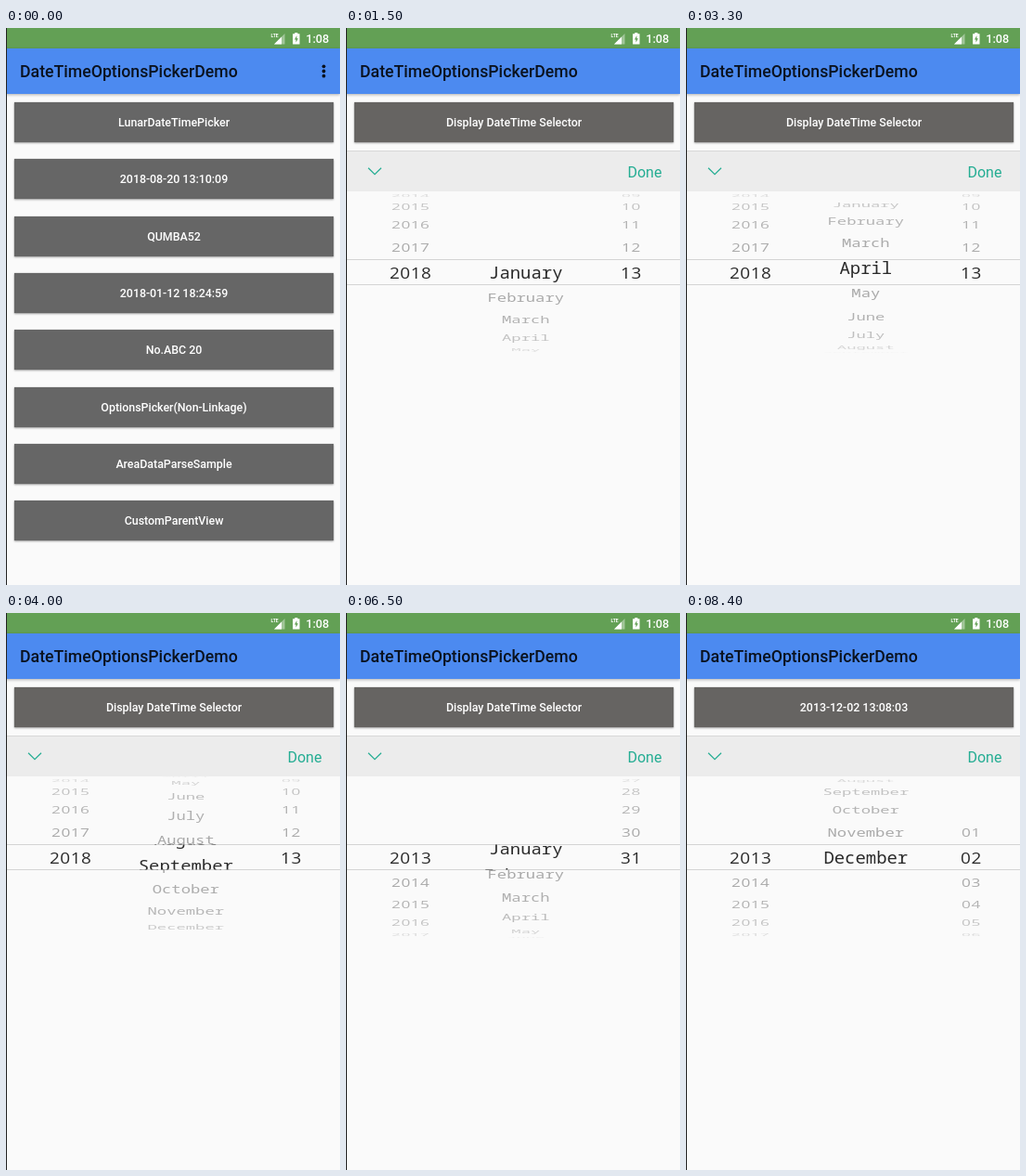
Animation, 360 px wide and 600 px high, one loop 8.6 s. Source, as an HTML page:

```html
<!DOCTYPE html>
<html lang="en">
<head>
<meta charset="utf-8">
<title>Date picker demo</title>
<style>
  html, body { margin: 0; width: 100%; height: 100%; overflow: hidden; background: #000; }
  #stage { position: relative; width: 360px; height: 600px; overflow: hidden; font-family: Roboto, sans-serif; }
  .screen { position: absolute; inset: 0; background: #fafafa; }
  .status { height: 22px; background: #63a055; }
  .bar {
    height: 49px; line-height: 50px; padding-left: 15px; background: #4c8af0;
    box-shadow: 0 1px 3px rgba(0, 0, 0, .3);
    font-size: 17.7px; font-weight: 500; color: rgba(0, 0, 0, .87);
  }
  .btn {
    position: absolute; left: 9px; width: 344px; height: 43px; line-height: 44px;
    background: #666; box-shadow: 0 0 1px rgba(0, 0, 0, .35), 0 1px 2px rgba(0, 0, 0, .35);
    font-size: 12.4px; font-weight: 500; color: #fff; text-align: center;
  }
  #result { top: 80px; background: #666462; }
  #panel { position: absolute; left: 0; top: 132px; width: 360px; height: 468px; }
  .tools {
    box-sizing: border-box; height: 44px; line-height: 45px; padding-right: 19.6px;
    background: #ececec; border-top: 1px solid #d8d8d8;
    font-size: 16px; color: #24ad93; text-align: right;
  }
  svg { position: absolute; left: 0; top: 0; }
  #wheels { top: -132px; }
  #wheels text { font-size: 17.2px; text-anchor: middle; }
  .num { font-family: "Open Sans", sans-serif; letter-spacing: .028em; }
  .word { font-family: "Noto Sans Mono", monospace; }
  #outer { fill: #a8a8a8; }
  #inner { fill: #2a2a2a; }
  .clock { font-size: 12.7px; font-weight: 500; }
  .lte { font-size: 5px; font-weight: 700; }
  #edge { position: absolute; left: 0; top: 0; width: 1px; height: 600px; background: #222; }
</style>
</head>
<body>
<div id="stage">
  <div class="screen" id="home">
    <div class="status"></div>
    <div class="bar">DateTimeOptionsPickerDemo</div>
    <svg width="360" height="80" fill="rgba(0,0,0,.87)">
      <circle cx="342.5" cy="41.3" r="1.9"/><circle cx="342.5" cy="46.5" r="1.9"/><circle cx="342.5" cy="51.7" r="1.9"/>
    </svg>
  </div>

  <div class="screen" id="page">
    <div class="status"></div>
    <div class="bar">DateTimeOptionsPickerDemo</div>
    <div class="btn" id="result"></div>
    <div id="panel">
      <div class="tools">Done</div>
      <svg id="wheels" width="360" height="600">
        <clipPath id="clipOuter"><path d="M0 176H360V249.5H0zM0 276.5H360V350H0z"/></clipPath>
        <clipPath id="clipInner"><path d="M0 249.5H360V276.5H0z"/></clipPath>
        <path d="M24 150.8L31 157.6L38 150.8" fill="none" stroke="#24ad93" stroke-width="1.2"/>
        <path d="M0 249.5H360M0 276.5H360" stroke="#d4d4d4"/>
        <g id="outer" clip-path="url(#clipOuter)"></g>
        <g id="inner" clip-path="url(#clipInner)"></g>
      </svg>
    </div>
  </div>

  <svg width="360" height="22" fill="#fff">
    <text class="lte" x="285.5" y="9.5">LTE</text>
    <path d="M289 17.5H300.5V6z" opacity=".4"/>
    <path d="M289 17.5H297V9.5z"/>
    <path d="M311.3 5h3v1.2h2.2v11.3h-7.4v-11.3h2.2z"/>
    <path d="M313.4 8l-2.4 4.4h1.5v3.4l2.4-4.5h-1.5z" fill="#63a055"/>
    <text class="clock" x="323.3" y="16.3">1:08</text>
  </svg>
  <div id="edge"></div>
</div>

<script>
const LOOP = 8600, STEP = 100;
const MID = 263.3, RADIUS = 87, ANGLE = Math.PI / 10;
const $ = id => document.getElementById(id);
const pad = n => String(n).padStart(2, '0');
const range = (n, make) => Array.from({ length: n }, (_, i) => make(i));

// Linear track through [time, value] points
function track(points, t) {
  if (t <= points[0][0]) return points[0][1];
  for (let i = 1; i < points.length; i++) {
    const [t0, v0] = points[i - 1], [t1, v1] = points[i];
    if (t < t1) return v0 + (v1 - v0) * (t - t0) / (t1 - t0);
  }
  return points[points.length - 1][1];
}

const slide = [[500, 12], [600, 4], [700, 1], [800, 0]];
const fade = [[500, .88], [600, .97], [700, 1]];
const yearPos = [[5300, 5], [5400, 4.8], [5500, 3.4], [5600, 1.5], [5700, .4], [5800, 0]];
const monthPos = [
  [2500, 0], [2600, .1], [2800, .8], [3100, 2.5], [3300, 3.18], [3500, 3.9], [3800, 6.6], [4000, 7.7], [4200, 8],
  [4500, 8], [4600, 7.7], [4800, 3.4], [4900, 1], [5000, .16], [5200, 0],
  [6400, 0], [6500, .33], [6700, 4], [6900, 9.2], [7000, 10.6], [7200, 11]
];
const dayPos = [[7200, 8], [7300, 7.8], [7400, 6.9], [7500, 4.6], [7600, 2.6], [7700, 1.4], [7800, 1]];

// Day limits follow the month and year picked
function days(t) {
  if (t < 4400) return { pos: 12, min: 0, max: 12 };
  if (t < 5400) return { pos: 12, min: 0, max: 29 };
  if (t < 6100) return { pos: 12, min: 0, max: 12 };
  if (t < 7200) return { pos: 30, min: 22, max: 30 };
  return { pos: track(dayPos, t), min: 0, max: 30 };
}

const months = 'January February March April May June July August September October November December'.split(' ');

// Labels on a cylinder: grey and fading outside the middle band, dark and wider inside it
function wheel(x, cls, labels) {
  const layers = [['outer', 1, .8, 1], ['inner', 1.1, 1, 0]].map(([id, sx, sy, fades]) => ({
    sx, sy, fades,
    items: labels.map(label => {
      const el = document.createElementNS('http://www.w3.org/2000/svg', 'text');
      el.setAttribute('class', cls);
      el.setAttribute('y', 6.2);
      el.textContent = label;
      return $(id).appendChild(el);
    })
  }));
  return (pos, min = 0, max = labels.length - 1) => {
    for (const { sx, sy, fades, items } of layers) items.forEach((el, i) => {
      const off = i - pos, a = off * ANGLE;
      const shown = i >= min && i <= max && Math.abs(off) < 5;
      el.style.display = shown ? '' : 'none';
      if (shown) {
        const y = MID + RADIUS * Math.sin(a);
        el.setAttribute('transform', `translate(${x} ${y}) scale(${sx} ${sy * Math.cos(a)})`);
        el.style.opacity = 1 - fades * Math.abs(off / 5) ** 2.2;
      }
    });
  };
}

const setYear = wheel(69.7, 'num', range(6, i => 2013 + i));
const setMonth = wheel(193.8, 'word', months);
const setDay = wheel(307.4, 'num', range(31, i => pad(i + 1)));

['LunarDateTimePicker', '2018-08-20 13:10:09', 'QUMBA52', '2018-01-12 18:24:59', 'No.ABC 20',
 'OptionsPicker(Non-Linkage)', 'AreaDataParseSample', 'CustomParentView'].forEach((label, i) => {
  const btn = document.createElement('div');
  btn.className = 'btn';
  btn.style.top = 80 + i * 61.3 + 'px';
  btn.textContent = label;
  $('home').append(btn);
});

function draw(t) {
  const open = t >= 500;
  $('home').style.opacity = open ? .78 : 1;
  $('page').style.display = open ? '' : 'none';
  $('page').style.opacity = track(fade, t);
  $('page').style.transform = `translateY(${track(slide, t)}px)`;
  $('panel').style.opacity = t < 1400 ? 0 : t < 1500 ? .85 : 1;
  $('result').textContent = t < 8400 ? 'Display DateTime Selector' : '2013-12-02 13:08:03';
  setYear(track(yearPos, t));
  setMonth(track(monthPos, t));
  const d = days(t);
  setDay(d.pos, d.min, d.max);
}

const start = performance.now();
let last = 0;
function tick() {
  const t = Math.floor((performance.now() - start) % LOOP / STEP) * STEP;
  if (t !== last) draw(last = t);
  requestAnimationFrame(tick);
}
draw(0);
requestAnimationFrame(tick);
</script>
</body>
</html>
```
